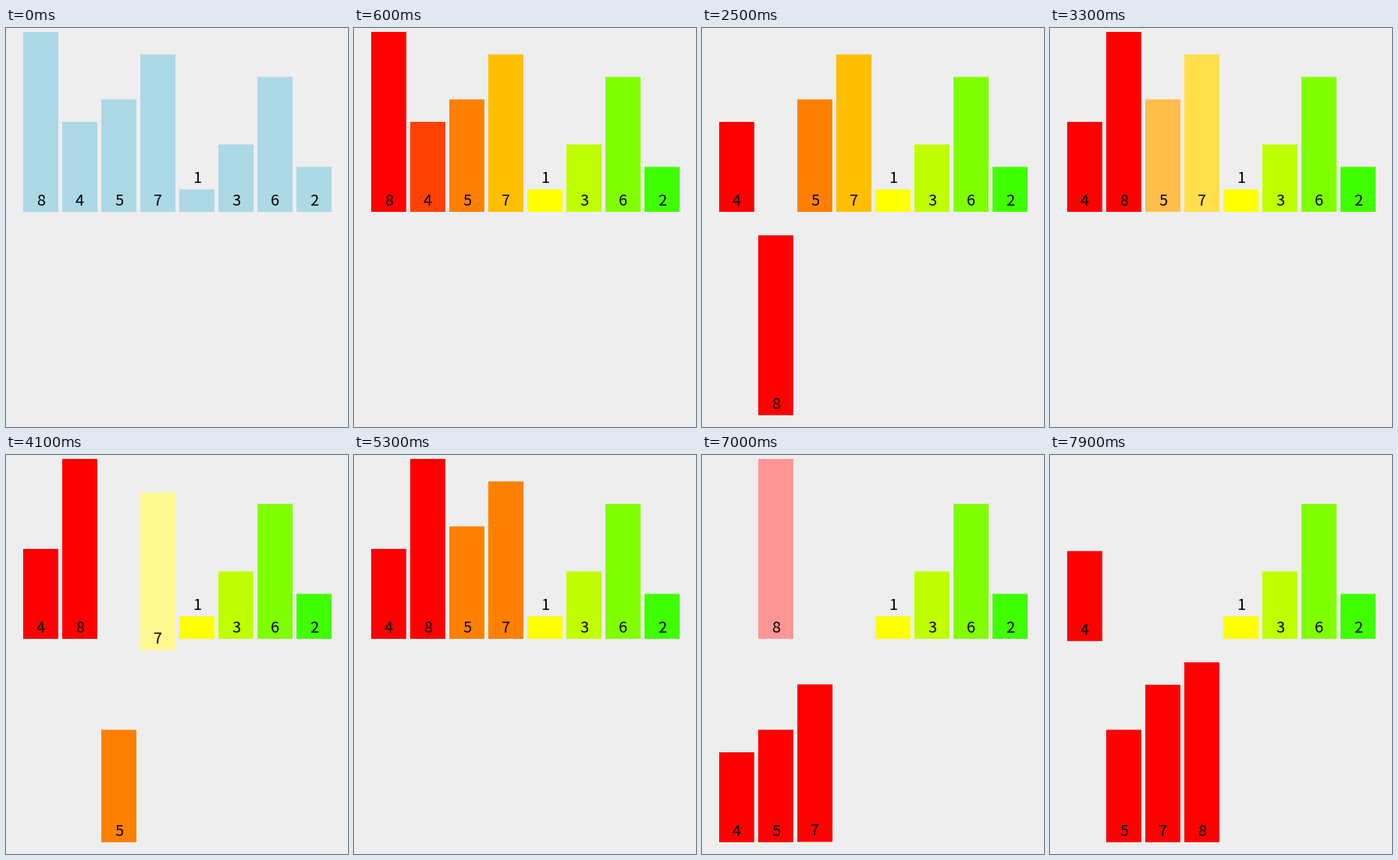
A matplotlib script for the animation above (8 s loop, 438 by 510 pixels).

```python
import colorsys

import matplotlib.pyplot as plt
import numpy as np
from matplotlib.animation import FuncAnimation
from matplotlib.patches import Rectangle

W, H, DPI = 438, 510, 64
INTERVAL, FRAMES = 100, 80
VALUES = [8, 4, 5, 7, 1, 3, 6, 2]
N = len(VALUES)
LEFT, PITCH, BAR_W, UNIT = 22, 50, 45, 28.75
BASE, DROP = 235, 260
GLOW = 150 / 255

# Start of each step in ms; every step eases over the same duration.
STARTS = [398, 895, 1329, 1785, 2248, 2704, 3195, 3594, 4068,
          4523, 4990, 5435, 5892, 6345, 6794, 7256, 7702]
DURATION = 212

RAINBOW = np.array([colorsys.hsv_to_rgb(15 * i / 360, 1, 1) for i in range(N)])
LIGHT_BLUE = np.array([173, 216, 230]) / 255


def slot_x(i):
    return LEFT + PITCH * i


def sort_poses():
    """One pose per step of a merge sort: rows of x, base y, r, g, b."""
    pose = np.array([[slot_x(i), BASE, *LIGHT_BLUE] for i in range(N)])
    base = RAINBOW.copy()
    poses = [pose.copy()]

    def save():
        poses.append(pose.copy())

    def glow(bar):
        pose[bar, 2:] = np.minimum(base[bar] + GLOW, 1)

    def sort(bars, lo):
        if len(bars) < 2:
            return bars
        mid = len(bars) // 2
        left = list(sort(bars[:mid], lo))
        right = list(sort(bars[mid:], lo + mid))
        glow(left[0])
        glow(right[0])
        save()

        merged = []
        while left or right:
            from_left = not right or (left and VALUES[left[0]] <= VALUES[right[0]])
            run = left if from_left else right
            bar = run.pop(0)
            base[bar] = RAINBOW[lo]
            pose[bar] = [slot_x(lo + len(merged)), BASE + DROP, *base[bar]]
            merged.append(bar)
            if run:
                glow(run[0])
            save()

        for bar in merged:
            pose[bar, 1] = BASE
            save()
        return merged

    pose[:, 2:] = base
    save()
    sort(list(range(N)), 0)
    return poses


POSES = sort_poses()


def pose_at(t):
    step = np.searchsorted(STARTS, t, side="right")
    if step == 0:
        return POSES[0]
    p = min((t - STARTS[step - 1]) / DURATION, 1)
    eased = 0.5 - np.cos(np.pi * p) / 2
    return POSES[step - 1] + (POSES[step] - POSES[step - 1]) * eased


fig = plt.figure(figsize=(W / DPI, H / DPI), dpi=DPI, facecolor="#eeeeee")
ax = fig.add_axes([0, 0, 1, 1])
ax.set_xlim(0, W)
ax.set_ylim(H, 0)
ax.axis("off")

bars, labels = [], []
for i, value in enumerate(VALUES):
    bars.append(ax.add_patch(Rectangle((0, 0), BAR_W, value * UNIT, linewidth=0,
                                       snap=False, zorder=2 * i + 1)))
    labels.append(ax.text(0, 0, str(value), family="Noto Sans CJK JP",
                          size=20 * 72 / DPI, color="black", ha="center",
                          va="baseline", zorder=2 * i + 2))


def draw(frame):
    for value, bar, label, (x, y, *rgb) in zip(VALUES, bars, labels,
                                               pose_at(frame * INTERVAL)):
        height = value * UNIT
        bar.set_xy((x, y - height))
        bar.set_facecolor(np.clip(rgb, 0, 1))
        # The shortest bar carries its number on top.
        rise = 8 if value > 1 else height + 8
        label.set_position((x + BAR_W / 2, y - rise))
    return bars + labels


anim = FuncAnimation(fig, draw, frames=FRAMES, interval=INTERVAL,
                     repeat=True, repeat_delay=0, blit=False)
plt.show()
```
